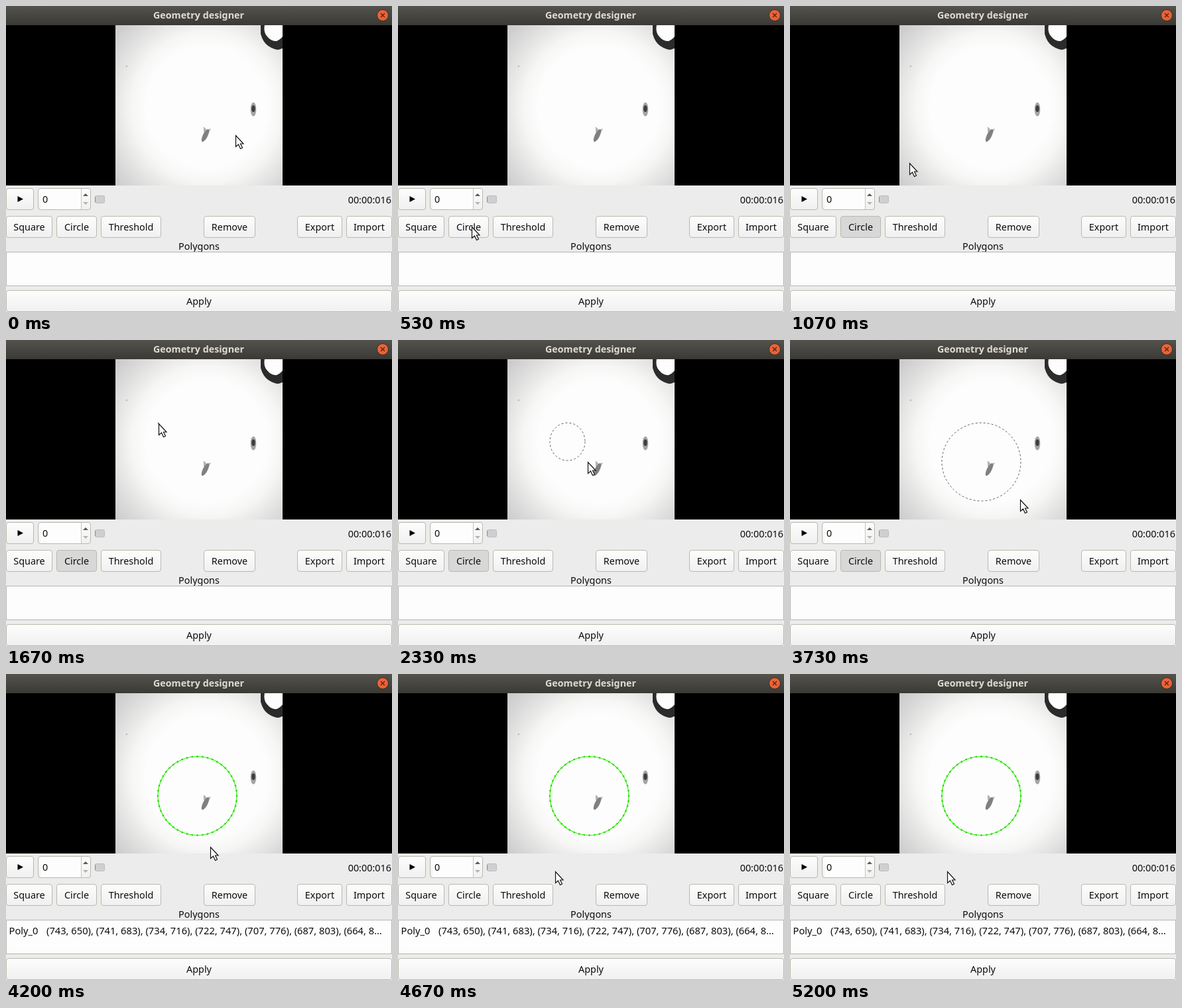
These frames come from a looping animation (582 px wide and 462 px high, 5.27 s). An HTML page:

```html
<!DOCTYPE html>
<html lang="en">
<head>
<meta charset="utf-8">
<title>Geometry designer</title>
<style>
  html, body { margin: 0; width: 100%; height: 100%; overflow: hidden; background: #ececec; }
  svg { display: block; width: 582px; height: 462px; }
  text { font: 14.4px "Noto Sans", "Open Sans", sans-serif; fill: #0c0c0c; }
  .mid { text-anchor: middle; }
  .end { text-anchor: end; }
  .title { font-size: 14.3px; font-weight: 600; fill: #dedbd2; }
  .row { font-size: 14.7px; white-space: pre; }
</style>
</head>
<body>
<svg viewBox="0 0 582 462">
  <defs>
    <linearGradient id="bar" x2="0" y2="1">
      <stop stop-color="#53524d"/><stop offset="1" stop-color="#3a3935"/>
    </linearGradient>
    <linearGradient id="raised" x2="0" y2="1">
      <stop stop-color="#fdfdfd"/><stop offset="1" stop-color="#f0f0f0"/>
    </linearGradient>
    <radialGradient id="light" gradientUnits="userSpaceOnUse" cx="303" cy="153" r="190">
      <stop offset=".48" stop-color="#fdfdfd"/>
      <stop offset=".6" stop-color="#f6f6f5"/>
      <stop offset=".7" stop-color="#e9e9e8"/>
      <stop offset=".82" stop-color="#dadada"/>
      <stop offset="1" stop-color="#c6c6c6"/>
    </radialGradient>
    <filter id="soft" x="-30%" y="-30%" width="160%" height="160%"><feGaussianBlur stdDeviation=".7"/></filter>
    <clipPath id="view"><path d="M165 29h252v242h-252z"/></clipPath>
  </defs>

  <path fill="#ececec" d="M0 0h582v462H0z"/>
  <path fill="url(#bar)" d="M0 0h582v29H0z"/>
  <text class="mid title" x="290.5" y="19">Geometry designer</text>
  <circle cx="568" cy="14" r="8.5" fill="#ec6236" stroke="#35302a"/>
  <path d="M565 11l6 6m0-6l-6 6" stroke="#4a2418" stroke-width="1.3"/>

  <path d="M0 29h582v242H0z"/>
  <g clip-path="url(#view)">
    <path fill="url(#light)" d="M165 29h252v242h-252z"/>
    <g filter="url(#soft)">
      <path fill="#2b2b2b" d="M384 24V42Q387 54 395 60 404 66 411 66L422 62V24z"/>
      <path fill="#fdfdfd" d="M391 24Q387 38 393 45 400 54 408 53 416 50 422 38V24z"/>
      <path fill="#b4b4b4" d="M298 182l5 5 6-2-4 8-7-2z"/>
      <ellipse cx="300.5" cy="195.5" rx="3.6" ry="10.5" transform="rotate(27 300.5 195.5)" fill="#808080"/>
      <ellipse cx="373" cy="156" rx="4.300" ry="10.5" fill="#a4a4a6"/>
      <ellipse cx="373" cy="155" rx="2.700" ry="5" fill="#3c3c42"/>
      <circle cx="182" cy="91" r="1.2" fill="#b8b8b8"/>
    </g>
    <ellipse id="draft" fill="none" stroke="#33334c" stroke-width=".8" stroke-dasharray="3 3"/>
    <g id="polygon"></g>
  </g>

  <g id="controls"></g>
  <path d="M17.5 287v9l8.500-4.500z"/>
  <path fill="#fdfdfd" d="M52 276h61v31H52z"/>
  <path stroke="#c4c4c0" d="M113.500 276v31"/>
  <path fill="#585858" d="M116 287l4-4 4 4z"/>
  <path fill="#b2b2b2" d="M116 296l4 4 4-4z"/>
  <text x="55" y="297">0</text>
  <rect x="134.500" y="286.500" width="14" height="11" rx="2" fill="#cfcfd2" stroke="#bcbcbc"/>
  <path stroke="#5d9ca0" d="M134.500 288v8"/>
  <text class="end" x="581" y="298">00:00:016</text>
  <text class="mid" x="291" y="368">Polygons</text>
  <path fill="#fdfdfd" stroke="#b4b4b0" d="M.5 371.500h581v51H.5z"/>
  <g id="entry">
    <text class="row" x="4.500" y="393">Poly_0</text>
    <text class="row" x="61" y="393">(743, 650), (741, 683), (734, 716), (722, 747), (707, 776), (687, 803), (664, 8…</text>
  </g>
  <path id="pointer" d="M.5 .5V17.500L4.500 14 7.500 20.500 10.500 19 7.500 13H12z" fill="#fdfdfd" stroke="#111" stroke-width="1.200"/>
</svg>
<script>
const LOOP = 5270, STEP = 1000 / 15;
const PRESS = 670, DRAG = 1600, COMMIT = 3930;
const $ = id => document.getElementById(id);

function make(parent, tag, attrs, text = '') {
  const el = document.createElementNS('http://www.w3.org/2000/svg', tag);
  for (const key in attrs) el.setAttribute(key, attrs[key]);
  el.textContent = text;
  return parent.appendChild(el);
}

function button(x, y, width, label) {
  const box = make($('controls'), 'rect', {
    x: x + .5, y: y + .5, width: width - 1, height: 32, rx: 3.5,
    fill: 'url(#raised)', stroke: '#bab9ad'
  });
  make($('controls'), 'text', { x: x + width / 2, y: y + 22, class: 'mid' }, label);
  return box;
}

button(0, 275, 42, '');
button(48, 275, 80, '');
button(0, 317, 70, 'Square');
const circleButton = button(76, 317, 61, 'Circle');
button(143, 317, 91, 'Threshold');
button(298, 317, 78, 'Remove');
button(439, 317, 68, 'Export');
button(513, 317, 69, 'Import');
button(0, 429, 582, 'Apply');

// Committed outline with its vertices
const ring = { cx: 288.5, cy: 184, r: 59.5 }, CORNERS = 48;
const corners = Array.from({ length: CORNERS }, (_, i) => {
  const a = i / CORNERS * 2 * Math.PI;
  return [ring.cx + ring.r * Math.cos(a), ring.cy + ring.r * Math.sin(a)];
});
make($('polygon'), 'polygon', { points: corners.join(' '), fill: 'none', stroke: '#38f010', 'stroke-width': 1.2 });
for (const [x, y] of corners) {
  make($('polygon'), 'rect', { x: x - 1.2, y: y - 1.2, width: 2.4, height: 2.4, fill: '#22dc00' });
}

// Keys: time, x, y
const pointerPath = [
  [70, 346, 195], [550, 110, 334], [740, 110, 334], [1070, 180, 237],
  [1430, 229, 125], [DRAG, 229, 125], [2330, 286, 184],
  [3070, 331, 230], [3600, 348, 243], [3730, 347, 241], [COMMIT, 347, 241], [4600, 237, 298]
];
const draftPath = [[DRAG, 229, 125], [2330, 282, 182], [3070, 329, 229], [3670, 348, 243]];

// Monotone cubic through the keys: no stop at a key passed in motion
function along(path, t, axis) {
  const last = path.length - 1;
  if (t <= path[0][0]) return path[0][axis];
  if (t >= path[last][0]) return path[last][axis];
  const i = path.findIndex(key => key[0] > t);
  const rate = n => n < 1 || n > last ? 0 : (path[n][axis] - path[n - 1][axis]) / (path[n][0] - path[n - 1][0]);
  const slope = n => {
    const a = rate(n), b = rate(n + 1);
    return a * b > 0 ? 2 * a * b / (a + b) : 0;
  };
  const from = path[i - 1], to = path[i], span = to[0] - from[0];
  const u = (t - from[0]) / span, v = 1 - u;
  return v * v * (1 + 2 * u) * from[axis] + u * u * (1 + 2 * v) * to[axis]
    + span * u * v * (v * slope(i - 1) - u * slope(i));
}

const point = (path, t) => [1, 2].map(axis => Math.round(along(path, t, axis)));
const show = (el, on) => el.setAttribute('visibility', on ? 'visible' : 'hidden');

function draw(now) {
  const t = Math.round(Math.floor((now % LOOP + 5) / STEP) * STEP / 10) * 10;
  const [px, py] = point(pointerPath, t);
  $('pointer').setAttribute('transform', `translate(${px} ${py})`);

  const [right, bottom] = point(draftPath, t);
  const rx = (right - 229) / 2, ry = (bottom - 125) / 2;
  const shape = { cx: 229 + rx, cy: 125 + ry, rx, ry };
  for (const key in shape) $('draft').setAttribute(key, shape[key]);

  const done = t >= COMMIT;
  show($('draft'), t > DRAG && !done);
  show($('polygon'), done);
  show($('entry'), done);
  circleButton.setAttribute('fill', t >= PRESS && !done ? '#d8d8d8' : 'url(#raised)');
}

const start = performance.now();
function tick() {
  draw(performance.now() - start);
  requestAnimationFrame(tick);
}
tick();
</script>
</body>
</html>
```
